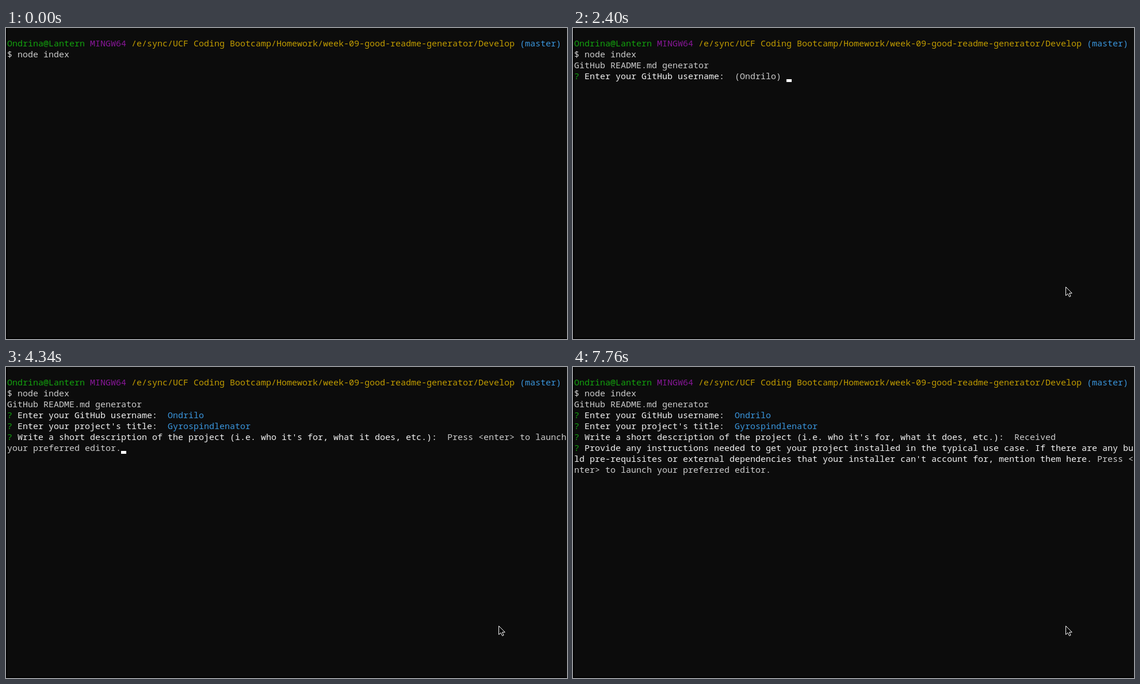
Animation of 975 by 541 pixels, one loop 8000 ms. Source, as an HTML page:

```html
<!DOCTYPE html>
<html lang="en">
<head>
<meta charset="utf-8">
<title>Terminal session</title>
<style>
  html, body { margin: 0; width: 100%; height: 100%; overflow: hidden; background: #0c0c0c; }
  svg { display: block; width: 975px; height: 541px; }
  text { font: 15px "Noto Sans Mono", "DejaVu Sans Mono", monospace; font-variant-ligatures: none; white-space: pre; }
</style>
</head>
<body>
<svg id="stage" viewBox="0 0 975 541">
  <rect width="975" height="541" fill="#0c0c0c"/>
  <path d="M0 0H2V541H0zM0 539H975V541H0z" fill="#000"/>
  <g id="screen"></g>
  <rect id="caret" width="9" height="5" fill="#fff"/>
  <path id="pointer" d="M.5 .5V15.5L4 12.2 6.6 17.6 9 16.5 6.5 11.3H11.2Z" fill="#000" stroke="#fff"/>
</svg>
<script>
const LOOP = 8000, CELL = 9, ROW = 19, LEFT = 2, BASE = 32;
const GREEN = '#13a10e', PURPLE = '#881798', YELLOW = '#c19c00',
      BLUE = '#3a96dd', GRAY = '#cccccc', WHITE = '#f2f2f2';
const byId = id => document.getElementById(id);
const pieces = [];

// Writes colored runs on one row, visible from start until end.
function line(row, start, end, runs, col = 0) {
  for (const [color, words] of runs) {
    const node = document.createElementNS('http://www.w3.org/2000/svg', 'text');
    node.setAttribute('x', LEFT + col * CELL);
    node.setAttribute('y', BASE + row * ROW);
    node.setAttribute('fill', color);
    node.textContent = words;
    byId('screen').append(node);
    pieces.push({ node, start, end });
    col += words.length;
  }
}

// A question stays; its hint gives way to the answer.
function ask(row, start, question, hint, answered, answer, answerColor) {
  line(row, start, LOOP, [[GREEN, '? '], [WHITE, question]]);
  const col = question.length + 4;
  line(row, start, answered, [[GRAY, hint]], col);
  line(row, answered, LOOP, [[answerColor, answer]], col);
}

const user = 'Ondrilo', project = 'Gyrospindlenator';
line(0, 0, LOOP, [
  [GREEN, 'Ondrina@Lantern '], [PURPLE, 'MINGW64 '],
  [YELLOW, '/e/sync/UCF Coding Bootcamp/Homework/week-09-good-readme-generator/Develop '],
  [BLUE, '(master)']
]);
line(1, 0, LOOP, [[GRAY, '$ node index']]);
line(2, 1550, LOOP, [[GRAY, 'GitHub README.md generator']]);
ask(3, 1550, 'Enter your GitHub username:', `(${user})`, 2720, user, BLUE);
ask(4, 2720, "Enter your project's title:", `(${project})`, 4340, project, BLUE);
ask(5, 4340, "Write a short description of the project (i.e. who it's for, what it does, etc.):",
  'Press <enter> to launch', 7300, 'Received', GRAY);
line(6, 4340, 7300, [[GRAY, 'your preferred editor.']]);
line(6, 7300, LOOP, [[GREEN, '? '],
  [WHITE, 'Provide any instructions needed to get your project installed in the typical use case. If there are any bu']]);
line(7, 7300, LOOP, [
  [WHITE, "ld pre-requisites or external dependencies that your installer can't account for, mention them here. "],
  [GRAY, 'Press <']
]);
line(8, 7300, LOOP, [[GRAY, 'nter> to launch your preferred editor.']]);

// Caret: [start, end, column, row]
const blinks = [
  [850, 1240, 12, 1], [1240, 1390, 0, 2],
  [1550, 1860, 41, 3], [2400, 2720, 41, 3],
  [2720, 2950, 50, 4], [3490, 3950, 50, 4],
  [4340, 4500, 22, 6], [5040, 5590, 22, 6],
  [7300, 7760, 38, 8]
];
const pointerPath = [[887, 515], [868, 480], [843, 436], [850, 443], [856, 450]];

const show = (node, on) => node.setAttribute('visibility', on ? 'visible' : 'hidden');
const active = (t, start, end) => t >= start && t < end;

function render(t) {
  for (const p of pieces) show(p.node, active(t, p.start, p.end));

  const blink = blinks.find(b => active(t, b[0], b[1]));
  show(byId('caret'), blink);
  if (blink) {
    byId('caret').setAttribute('x', LEFT + blink[2] * CELL);
    byId('caret').setAttribute('y', BASE + blink[3] * ROW);
  }

  const step = Math.min(Math.floor((t - 70) / 80), pointerPath.length - 1);
  show(byId('pointer'), step >= 0);
  if (step >= 0) byId('pointer').setAttribute('transform', `translate(${pointerPath[step]})`);
}

const origin = performance.now();
function tick() {
  render((performance.now() - origin) % LOOP);
  requestAnimationFrame(tick);
}
tick();
</script>
</body>
</html>
```
